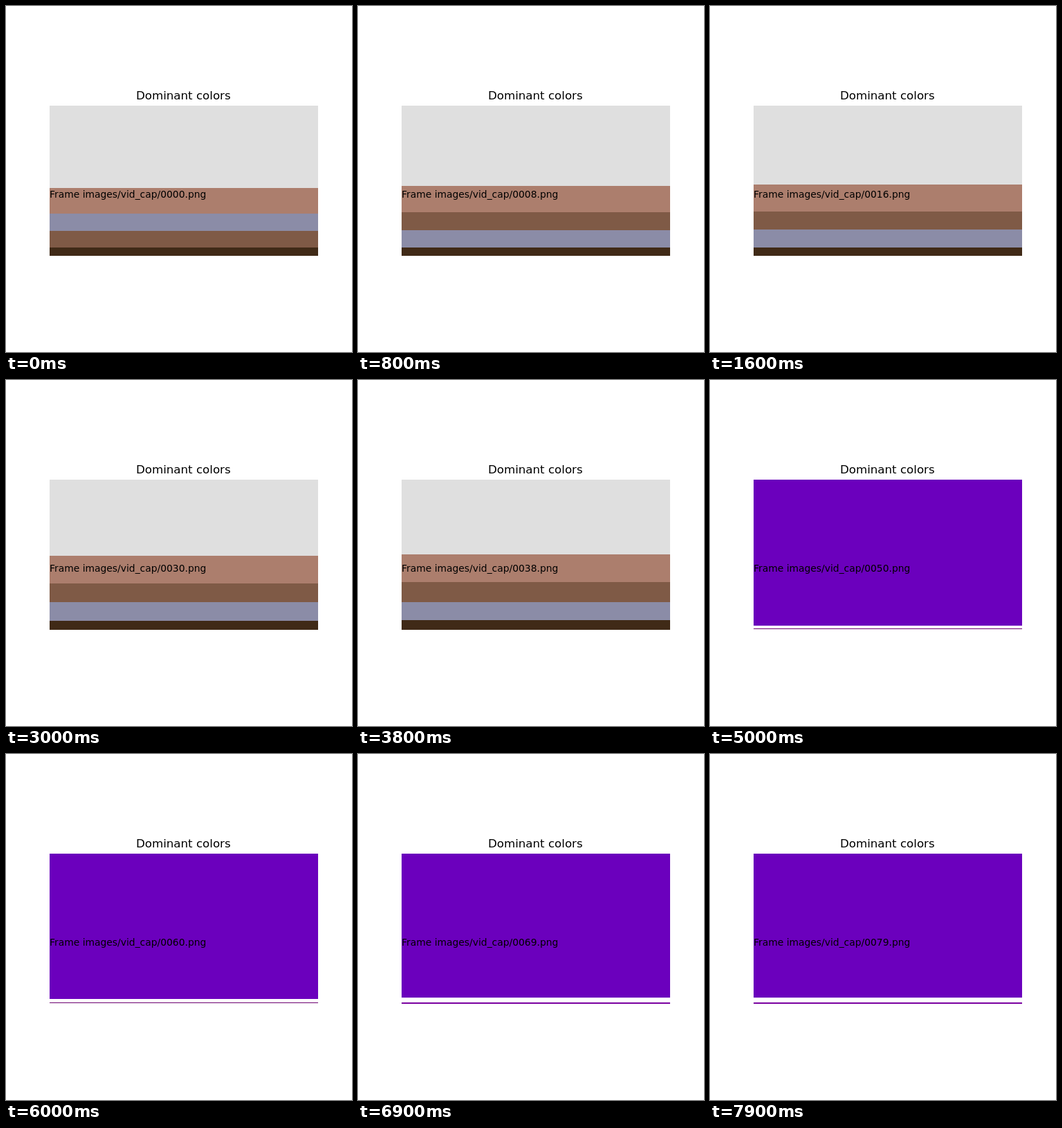
An HTML page that plays this animation: 500x500 px, repeating every 8 s.

```html
<!DOCTYPE html>
<html lang="en">
<head>
<meta charset="utf-8">
<title>Dominant colors</title>
<style>
  html, body { margin: 0; width: 100%; height: 100%; overflow: hidden; background: #fff; }
  svg { display: block; width: 100vw; height: 100vh; }
  text { font-family: "DejaVu Sans", sans-serif; fill: #000; }
</style>
</head>
<body>
<svg viewBox="0 0 500 500">
  <g id="bars" shape-rendering="crispEdges"></g>
  <text x="256.25" y="135" font-size="16.667" text-anchor="middle">Dominant colors</text>
  <text id="label" x="63" y="277" font-size="13.889"></text>
</svg>
<script>
const LOOP = 8000, STEP = 100;
const LEFT = 63, WIDTH = 388, TOP = 144, BOTTOM = 361;
const SWAP = 2, CUT = 50, THICKEN = 62;
const GREY = '#dfdfdf', PINK = '#ac7e6d', BLUE = '#8b8ca7', BROWN = '#7f5a46',
      DARK = '#402a17', PURPLE = '#6b00bd', PLUM = '#6d0070', VIOLET = '#7a00a0';

const byId = id => document.getElementById(id);
const label = byId('label');

const bars = Array.from({ length: 5 }, () => {
  const bar = document.createElementNS('http://www.w3.org/2000/svg', 'rect');
  bar.setAttribute('x', LEFT);
  bar.setAttribute('width', WIDTH);
  return byId('bars').appendChild(bar);
});

// Each scene is a list of bands: [color, lower edge]
function earthBands(n) {
  const middle = n < SWAP ? [BLUE, BROWN] : [BROWN, BLUE];
  return [
    [GREY, 261.75 - 0.255 * n + 1.2 * Math.exp(-n / 2)],
    [PINK, 300 - 0.205 * n],
    [middle[0], 324.7 - 0.11 * n],
    [middle[1], 349.3 - 0.049 * n],
    [DARK, BOTTOM]
  ];
}

function purpleBands(n) {
  const lineTop = BOTTOM - 2;
  return [
    [PURPLE, Math.max(352, 355.2 - 0.15 * (n - CUT))],
    ['none', lineTop],
    n < THICKEN ? [PLUM, lineTop + 1] : [VIOLET, BOTTOM]
  ];
}

function render(ms) {
  const n = Math.floor((ms % LOOP) / STEP);
  const bands = n < CUT ? earthBands(n) : purpleBands(n);

  let y = TOP;
  bars.forEach((bar, i) => {
    const [color, edge] = bands[i] ?? ['none', y];
    const end = Math.round(edge);
    bar.setAttribute('y', y);
    bar.setAttribute('height', end - y);
    bar.setAttribute('fill', color);
    y = end;
  });
  label.textContent = `Frame images/vid_cap/${String(n).padStart(4, '0')}.png`;
}

const start = performance.now();
function tick() {
  render(performance.now() - start);
  requestAnimationFrame(tick);
}
tick();
</script>
</body>
</html>
```
